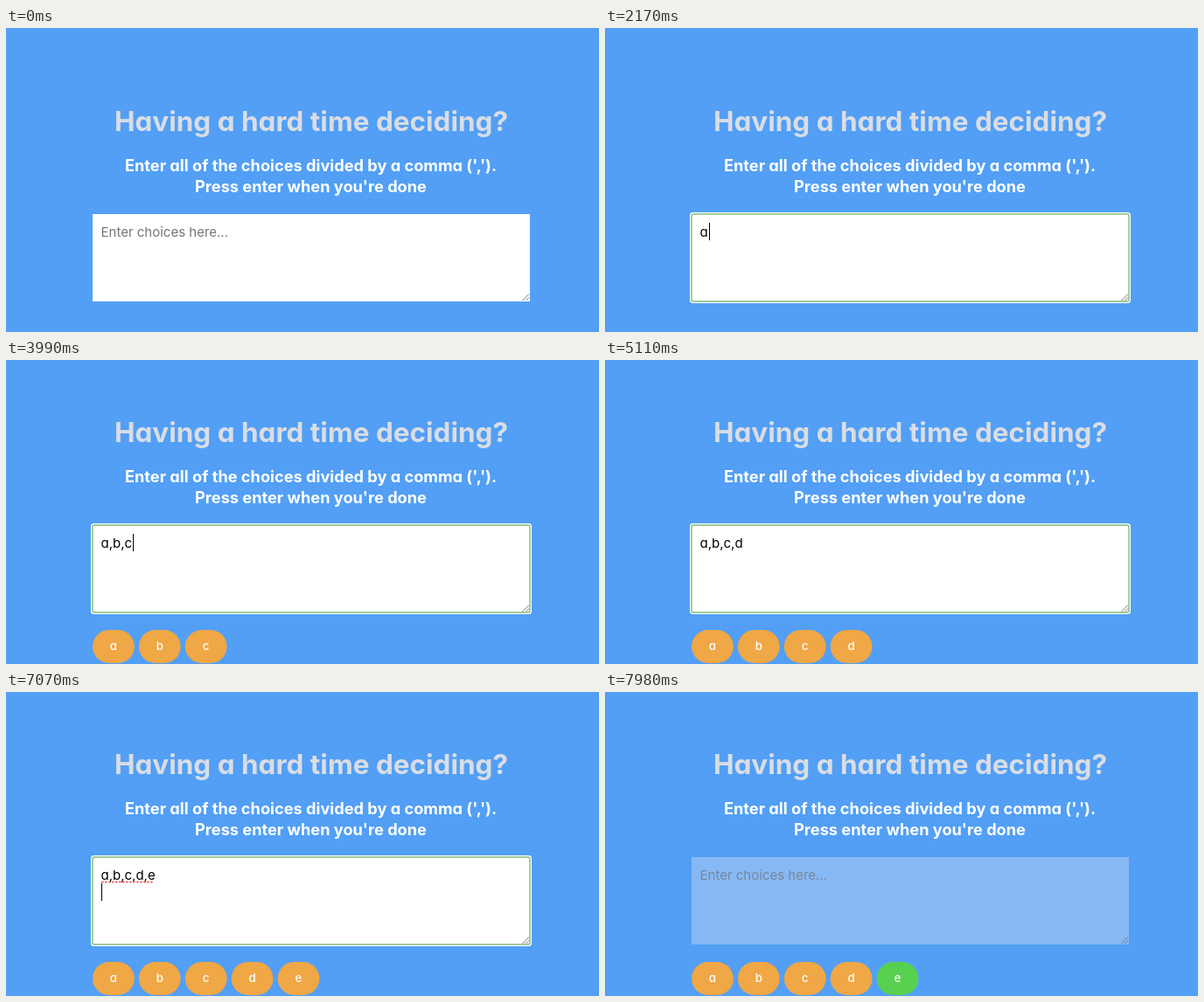
These frames come from a looping animation (678x348 px, 8 s). An HTML page:

```html
<!DOCTYPE html>
<html lang="en">
<head>
<meta charset="utf-8">
<title>Choice picker</title>
<style>
  html, body { margin: 0; width: 100%; height: 100%; overflow: hidden; background: #529ff5; }
  svg { display: block; width: 100%; height: 100%; }
  text {
    font-family: Inter, "Open Sans", sans-serif;
    font-feature-settings: "cv11";
    font-optical-sizing: none;
  }
  .mid { text-anchor: middle; }
  .title { font-size: 31.5px; font-weight: 700; fill: #d9dde5; }
  .hint { font-size: 18.2px; font-weight: 700; fill: #fff; }
  .field { font-size: 15px; }
  .tag text { font-size: 13.3px; font-weight: 500; fill: #fff; }
</style>
</head>
<body>
<svg viewBox="0 0 678 348">
  <rect width="678" height="348" fill="#529ff5"/>
  <g id="form">
    <text class="title mid" x="349" y="117.5">Having a hard time deciding?</text>
    <text class="hint mid" x="348.5" y="164">Enter all of the choices divided by a comma (',').</text>
    <text class="hint mid" x="348.5" y="188">Press enter when you're done</text>
    <rect id="halo" x="97" y="211" width="504" height="104" rx="3.5" fill="#fff"/>
    <rect id="box" x="99" y="213" width="500" height="100"/>
    <rect id="ring" x="99" y="213" width="500" height="100" rx="2" fill="none" stroke="#7fbd7b" stroke-width="1.4"/>
    <path d="M590.5 312L598 304.5M594.5 312L598 308.5" stroke="#777" stroke-width="1"/>
    <text id="prompt" class="field" x="108.5" y="239">Enter choices here...</text>
    <text id="typed" class="field" x="108.5" y="239"></text>
    <path id="squiggle" d="M110 241.5H168" stroke="#e8605c" stroke-width="2" stroke-linecap="round" stroke-dasharray="0.8 3.2"/>
    <rect id="caret" width="1" height="20"/>
  </g>
  <g id="tags"></g>
</svg>
<script>
const LOOP = 8000;
const FOCUS = 1750, ENTER = 7000, CLEAR = 7330;
const STEP = 100;                       // highlight interval
const KEY_HOLD = 110;                   // a tag appears on key release
const BLINK = 500;
const KEYS = "a,b,c,d,e";
const KEY_TIMES = [2140, 2500, 2900, 3290, 3650, 4030, 4420, 5270, 5720];
const PICKS = [2, 0, 3, 1, 4, 4];
const ORANGE = "#f0a745", GREEN = "#58d04f";

const $ = id => document.getElementById(id);
const show = (el, on) => el.setAttribute("visibility", on ? "visible" : "hidden");

function svg(name, attrs, parent) {
  const el = document.createElementNS($("tags").namespaceURI, name);
  for (const key in attrs) el.setAttribute(key, attrs[key]);
  return parent.appendChild(el);
}

const tags = KEYS.split(",").map((label, i) => {
  const x = 99 + i * 52.9;
  const group = svg("g", { class: "tag" }, $("tags"));
  const pill = svg("rect", { x, y: 309, width: 47.8, height: 38, rx: 19 }, group);
  svg("text", { x: x + 23.9, y: 332, class: "mid" }, group).textContent = label;
  return { group, pill, start: KEY_TIMES[i * 2] + KEY_HOLD };
});

function drawCaret(t, count, focused) {
  const newline = t >= ENTER;
  const since = t - (newline ? ENTER : count ? KEY_TIMES[count - 1] : FOCUS);
  const end = count ? $("typed").getComputedTextLength() + 1 : 0;
  $("caret").setAttribute("x", newline ? 109 : Math.round(108.5 + end));
  $("caret").setAttribute("y", newline ? 243 : 223);
  show($("caret"), focused && since % (2 * BLINK) < BLINK);
}

function render(t) {
  const cleared = t >= CLEAR;
  const focused = t >= FOCUS && !cleared;
  const count = cleared ? 0 : KEY_TIMES.filter(k => t >= k).length;
  const shift = t >= tags[0].start ? -24 : 0;

  $("form").setAttribute("transform", `translate(0 ${shift})`);
  $("box").setAttribute("fill", cleared ? "#87b8f6" : "#fff");
  $("prompt").setAttribute("fill", cleared ? "#78879a" : "#757575");
  $("typed").textContent = KEYS.slice(0, count);
  show($("halo"), focused);
  show($("ring"), focused);
  show($("prompt"), count === 0);
  show($("squiggle"), t >= ENTER && !cleared);
  drawCaret(t, count, focused);

  const pick = PICKS[Math.floor((t - CLEAR) / STEP) - 1];
  tags.forEach((tag, i) => {
    show(tag.group, t >= tag.start);
    tag.pill.setAttribute("fill", i === pick ? GREEN : ORANGE);
  });
}

const origin = performance.now();
function tick() {
  render((performance.now() - origin) % LOOP);
  requestAnimationFrame(tick);
}
tick();
</script>
</body>
</html>
```
